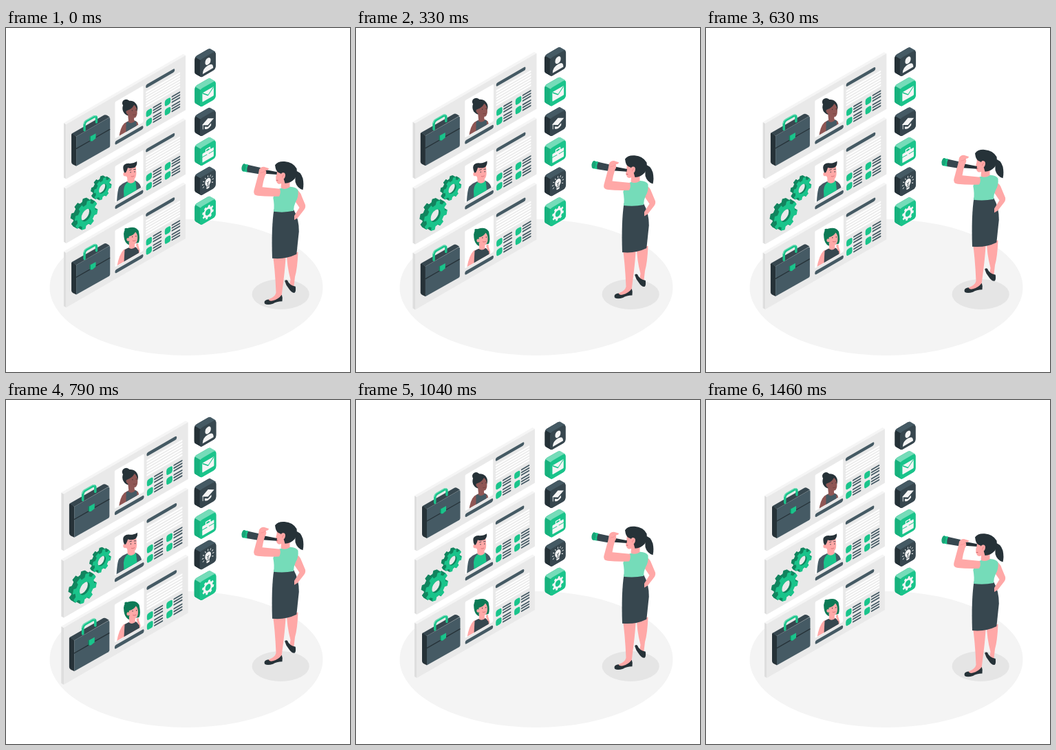
Recreate the animation shown at these times as an HTML page with a canvas. Size 500 px wide and 500 px high, loop 1500 ms.

```html
<!DOCTYPE html>
<html lang="en">
<head>
<meta charset="utf-8">
<title>Choosing a candidate</title>
<style>
html, body { margin: 0; width: 100%; height: 100%; overflow: hidden; background: #fff; }
canvas { display: block; width: 100vw; height: 100vh; }
</style>
</head>
<body>
<canvas id="stage" width="500" height="500"></canvas>
<script>
const ctx = document.getElementById('stage').getContext('2d');
const LOOP = 1500, STEP = LOOP / 36;
const GREEN = '#1ac48b', MINT = '#75dcb9', DEEP = '#12855f';
const INK = '#263238', SLATE = '#37474f', STEEL = '#455a64';
const SKIN = '#ffa8a7', BROWN = '#8f5654', FACE = '#e9e9e9', PALE = '#f5f5f5';

function fill(color, d) {
  ctx.fillStyle = color;
  ctx.fill(new Path2D(d));
}
function stroke(color, width, d) {
  ctx.strokeStyle = color;
  ctx.lineWidth = width;
  ctx.lineCap = ctx.lineJoin = 'round';
  ctx.stroke(new Path2D(d));
}
function oval(color, x, y, rx, ry = rx, turn = 0) {
  ctx.fillStyle = color;
  ctx.beginPath();
  ctx.ellipse(x, y, rx, ry, turn, 0, Math.PI * 2);
  ctx.fill();
}
function box(color, x, y, w, h, r = 0) {
  ctx.fillStyle = color;
  ctx.beginPath();
  ctx.roundRect(x, y, w, h, r);
  ctx.fill();
}
function group(draw) {
  ctx.save();
  draw();
  ctx.restore();
}
function shifted(dy, draw) {
  group(() => {
    ctx.translate(0, dy);
    draw();
  });
}
// Isometric wall plane with its origin at x, y.
function wall(x, y, draw) {
  group(() => {
    ctx.transform(0.866, -0.5, 0, 1, x, y);
    draw();
  });
}
function zoomed(x, y, scale, draw) {
  group(() => {
    ctx.translate(x, y);
    ctx.scale(scale, scale);
    ctx.translate(-x, -y);
    draw();
  });
}

function gearShape(color, x, y, r, teeth = 8) {
  const slice = Math.PI * 2 / teeth;
  ctx.beginPath();
  for (let i = 0; i < teeth; i++) {
    [[-0.29, 0.78], [-0.21, 1], [0.21, 1], [0.29, 0.78]].forEach(([a, k]) => {
      const angle = (i + 0.3 + a) * slice;
      ctx.lineTo(x + Math.cos(angle) * r * k, y + Math.sin(angle) * r * k);
    });
  }
  ctx.closePath();
  ctx.fillStyle = color;
  ctx.fill();
}
function gear(x, y, r, depth) {
  for (let d = depth; d > 0; d -= 0.5) gearShape(DEEP, x - d, y - d, r);
  gearShape(GREEN, x, y, r);
  oval(DEEP, x, y, r * 0.42);
  group(() => {
    ctx.beginPath();
    ctx.arc(x, y, r * 0.42, 0, 7);
    ctx.clip();
    oval(FACE, x - depth * 0.45, y - depth * 0.45, r * 0.42);
  });
}

function briefcase() {
  fill(INK, 'M96 155.5 Q96 154 98 154 L103 158.5 V201 L98 198.5 Q96 197 96 195Z');
  fill(SLATE, 'M96.5 154.3 L143 127.7 Q145 126.8 147 128 L151 130.5 L103 158.5Z');
  fill(STEEL, 'M103 158.5 L149.5 131.6 Q151.5 130.7 151.5 133 V171.5 Q151.5 173.5 150 174.4 L103 201Z');
  stroke(INK, 1.3, 'M103 176 L124 164 M130.5 160 L151 148.3');
  fill(GREEN, 'M123 158.5 L131 154 V161 L126 165.2 L123 165Z');
  fill(DEEP, 'M122 157.5 L123.5 158.5 V165.5 L122 164.5Z');
  stroke(GREEN, 3.4, 'M114.8 149.5 V141.5 Q115 138 118 136.2 L128.5 130.2 Q132 128.8 132 132 V138');
  stroke(MINT, 1.2, 'M114 140.5 Q114.2 137 117 135.3 L128 129 Q130 128.2 131.2 129.2');
}

function womanWithBun() {
  oval(INK, 174.6, 110.5, 5.6, 5.4);
  oval(INK, 180.2, 118, 10.8, 10.8);
  fill(BROWN, 'M164 162 Q166 145 172 139.5 L178 136 L177 126 L186 130 V135 L191 138 Q194 144 194 162Z');
  fill(BROWN, 'M176.5 121 Q183 119 186 113 Q190 116 190.3 122 Q191 128 188 131.3 Q183 133 178 127.5 Q174 126 174.5 122Z');
  fill(STEEL, 'M174 162 L174.5 146 L174.5 138.5 L177 137 Q182 142 187.5 136 L189.5 137 Q189 144 191 147 V162Z');
  stroke(INK, 0.8, 'M183.3 120.9 V121.5 M188.6 120 V120.7');
  stroke('#6d3f3a', 0.7, 'M184.5 127.3 Q186.5 128.2 188 127');
}
function youngMan() {
  fill(STEEL, 'M161 256 Q162 234 165 230 Q170 225 176 223 L188 222 Q195 225 196.5 234 L198 256Z');
  fill(GREEN, 'M172 256 L171 236 Q172 227 177 224 Q182 227 187.5 221.5 Q190 229 190 256Z');
  fill(SKIN, 'M176 215 L186 217 L187 223 Q182 228 176.5 224Z');
  fill(SKIN, 'M174 203 Q181 205 188.5 201.5 L189.2 211 Q189.2 219 184.5 220.5 Q177.5 220.5 174.8 215.5 Q169.8 216 170.4 212 Q171 209 173 210.5Z');
  fill(INK, 'M172 210.5 Q168.5 202 172 199 Q175 196.3 180 197.2 Q186 197.2 190 194.2 Q190.8 200 187 203 Q181 205 177 203.5 Q175.8 207.5 174 210.5Z');
  stroke(INK, 1, 'M181 209.5 V210.2 M186.8 208.8 V209.5');
  stroke(INK, 0.8, 'M179.5 206.8 L182 206 M185.5 205.8 L188 205.7');
  stroke('#c95f66', 0.7, 'M182 216 Q184 216.8 186 215.2');
}
function womanWithBob() {
  const hair = '#0e7a56';
  fill(hair, 'M171.5 303 Q169.5 292 177 290 Q188 286.5 192.5 294 Q195 306 192.5 311 L178 314 Q172.5 311 171.5 303Z');
  stroke(hair, 1.6, 'M176 291 Q172 290 173.5 293');
  fill(SKIN, 'M161 348 Q164 328 171 321 L179 318 L178.5 309 L187 312 V317 L194 321 L196 348Z');
  fill(SKIN, 'M178.5 302 Q185 300.5 188 295.5 Q190.8 298 191 303 Q191.3 310 187.5 312.8 Q182 313.8 179 308.5 Q175.3 309.5 175.3 306 Q176 303 178.5 304.5Z');
  fill(SLATE, 'M171 348 L172.5 321 L178 318 Q183 322 188 317 L192.5 321 L195 348Z');
  fill(SKIN, 'M188.5 314 L190.5 312 Q192.5 312 192 314.5 L194.5 323 L191 320.5Z');
  stroke(INK, 0.9, 'M183.5 302.2 V302.9 M188.8 301.3 V302');
  stroke('#c95f66', 0.7, 'M184 308.3 Q186 309.2 188 307.8');
}

function card(y, person) {
  wall(88.5, y, () => {
    fill('#dedede', 'M0 0 L-4 -4 V74.5 L0 78.5Z');
    fill(PALE, 'M0 0 L-4 -4 H194 L198 0Z');
    box(FACE, 0, 0, 198, 78.5);
    box('#fff', 81, 8.4, 46.8, 52.4, 1.5);
    box(STEEL, 81, 65.2, 46.8, 5.2, 2.4);
    box(STEEL, 132, 9.5, 48, 5, 2.4);
    for (let i = 0; i < 6; i++) box('#fff', 132, 19.4 + i * 4, 57, 2.3, 1);
    for (const u of [132.5, 163.5]) for (const v of [52, 65.3]) {
      box(GREEN, u, v - 4.8, 9.6, 9.4, 3);
      for (let i = -1; i < 2; i++) box(STEEL, u + 11.2, v + i * 3.9 - 1, 14.4, 2, 1);
    }
  });
  group(() => {
    wall(88.5, y, () => {
      ctx.beginPath();
      ctx.rect(81, 4, 46.8, 56.4);
    });
    ctx.clip();
    person();
  });
}
function cards(scale) {
  zoomed(172.7, 223, scale, () => {
    card(325.6, womanWithBob);
    shifted(184.6, briefcase);
    card(233.3, youngMan);
    wall(88.5, 233.3, () => {
      gear(60.6, 30.5, 15, 5);
      gear(33.3, 54.7, 19.3, 7);
    });
    card(141, womanWithBun);
    briefcase();
  });
}

const glyphs = [
  () => {
    oval(PALE, 13.2, 8.6, 4.6, 4.8);
    fill(PALE, 'M4.5 22.5 Q4.5 14.5 13.2 14.5 Q22 14.5 22 22.5Z');
  },
  back => {
    box(PALE, 4, 7, 18.8, 13.2, 1);
    stroke(back, 1.3, 'M4.8 8 L13.4 15 L22 8');
  },
  () => {
    fill(PALE, 'M3.5 10.5 L13.2 5.5 L23 10.5 L13.2 15.5Z');
    fill(PALE, 'M8 15.2 L13.2 18 L18.5 15.2 V18.3 Q13.2 22.3 8 18.3Z');
    stroke(PALE, 0.8, 'M5 11.5 V17');
  },
  back => {
    stroke(PALE, 1.5, 'M9.8 9.5 V6.5 H16.6 V9.5');
    box(PALE, 4, 9.5, 18.8, 12.8, 1);
    stroke(back, 1, 'M4 14.5 H11.5 M15 14.5 H23');
  },
  back => {
    oval(PALE, 13.2, 12, 4.8, 5.2);
    box(PALE, 10.8, 15, 4.8, 6.5, 1);
    stroke(back, 0.8, 'M11.2 18.6 H15.2 M11.7 12 L13.2 14 L14.7 12 M13.2 14 V17');
    for (let i = 0; i < 9; i++) {
      const a = Math.PI * (0.85 + i * 0.1625), c = Math.cos(a), s = Math.sin(a);
      stroke(PALE, 1, `M${13.2 + c * 7.4} ${12.5 + s * 7.4} L${13.2 + c * 9.2} ${12.5 + s * 9.2}`);
    }
  },
  back => {
    gearShape(PALE, 13.2, 13.2, 9.6);
    oval(back, 13.2, 13.2, 4.3);
  }
];
function icons(scale) {
  zoomed(289.5, 158.5, scale, () => glyphs.forEach((glyph, i) => {
    const [front, side, top] = i % 2 ? [GREEN, '#18b27e', MINT] : [SLATE, INK, STEEL];
    wall(282, 47.8 + i * 42.4, () => {
      for (let d = 8.8; d > 0; d -= 0.4) box(side, -d, -d, 26.2, 26.2, 4.5);
      fill(top, 'M1 1 L-7.8 -7.8 Q-6.4 -8.8 -4.4 -8.8 H13.4 Q15.6 -8.8 16.8 -7.8 L25.6 1Z');
      box(front, 0, 0, 26.2, 26.2, 4.5);
      glyph(front);
    });
  }));
}

function telescope() {
  fill(INK, 'M366 203.8 L394 209.3 L393.5 213 L366 211Z');
  fill(SLATE, 'M350 198.6 L370 203 L369 212.6 L349.5 209.2Z');
  fill(GREEN, 'M346 197.5 L352.3 198.8 Q349.5 203.5 350.6 209.5 L345 208.6Z');
  oval('#17a577', 345.5, 203, 3, 5.7, 0.15);
}
function lowerBody() {
  fill(SKIN, 'M408 326 L424.5 326 Q423.5 350 420 362 L418.5 375 L420 380 L412 376 L413.5 366 Q408 345 408 326Z');
  fill(INK, 'M405.2 368 Q406 365.5 409 367 Q411.5 374 420.8 376 Q421.8 383 419.5 385 Q415 385.5 411 379 L407.5 374Z');
  fill(SKIN, 'M387.5 328 H407 Q405.5 350 404 362 L400.5 390 Q394 398 381 398 Q379 396 383 394 Q391 391 392.5 385 Q391 350 387.5 328Z');
  fill(INK, 'M375.5 398.5 Q376.5 395 381.5 394.6 Q383 398 388 396.5 Q396 394.5 400.8 388 Q402.5 392 401.5 397.5 Q393 397.5 388 401 Q380 403.5 376 401Z');
  fill(SLATE, 'M389.5 264 H418 Q426 278 425.8 296 L422.3 329 Q406 337 387 335 Q385.5 290 389.5 264Z');
}
function armOnHip() {
  fill(SKIN, 'M419 234 Q427 235 430 245 L435 257 Q435.8 261 433 264.5 L424 276 L419 279 L419 273 L426.5 261 L417 247Z');
}
function upperBody() {
  fill(MINT, 'M397 234 Q404 231 413 231 Q422 231.5 424.5 236 Q425.5 246 421 253 Q418 259 418 266 Q404 269 389 267 Q390.5 258 388.3 247 Q391 238 397 234Z');
  fill(SKIN, 'M400.5 222 H412.5 V231.5 Q405 236 399.5 232.5Z');
}
function head() {
  fill(INK, 'M420 208 Q428 208 431.5 219 Q433.3 228 431.5 235.5 Q423 233 420.5 224Z');
  fill(SKIN, 'M394 203 L393.5 212 L392.2 217 Q392 225 396 226.8 Q401 227.5 407 222 L410 205Z');
  fill(INK, 'M391 199.5 Q395 193.5 405 194.2 Q417 195 422.5 204.5 Q424 213 419.5 219.5 Q414 225.5 405.5 226 L403.5 219 L399 211.5 Q393 210 391.8 204Z');
  oval(SKIN, 402.5, 215, 3.4, 4.6, 0.2);
  stroke('#e8797f', 0.7, 'M401.5 217 Q401.8 213.5 404 213.5');
  stroke('#c95f66', 0.9, 'M393 221.5 H395');
}
function raisedArm() {
  fill(SKIN, 'M368 206 Q370 201.8 375 202 L382 204.2 Q381.8 207 377.5 207 Q379.5 211 376.5 215 Q373.5 224 372.5 231.5 L398 234 Q400 240 397 244.8 Q380 245.5 366 244 Q359 243 360.3 237 L366.5 214Z');
  stroke('#f28f92', 0.7, 'M370.5 210.5 Q374 211 377.5 207');
}
// The hip arm and the telescope follow the body only part of the way.
function woman(lift) {
  oval('#e5e5e5', 399.2, 387, 41.6, 22);
  shifted(-lift, lowerBody);
  shifted(-lift * 0.6, armOnHip);
  shifted(-lift, () => { upperBody(); head(); });
  shifted(-lift * 0.48, telescope);
  shifted(-lift, raisedArm);
}

// Two quick swells, then a rest.
function swell(t) {
  const keys = [[0, 0], [150, 1], [450, 0], [600, 0], [750, 1], [900, 0], [1500, 0]];
  const i = keys.findIndex(([time]) => time > t);
  const [t0, a] = keys[i - 1], [t1, b] = keys[i];
  return 1 + 0.091 * (a + (b - a) * (t - t0) / (t1 - t0));
}

function frame(now) {
  const t = Math.floor((now % LOOP + 4) / STEP) % 36 * STEP;
  const scale = swell((t + 20) % LOOP);
  const lift = 8.9 * (1 + Math.cos((t - 706) / LOOP * Math.PI * 2));
  ctx.fillStyle = '#fff';
  ctx.fillRect(0, 0, 500, 500);
  oval('#f4f4f4', 262, 377, 198.5, 99);
  cards(scale);
  icons(scale);
  woman(lift);
}
const start = performance.now();
function tick() {
  frame(performance.now() - start);
  requestAnimationFrame(tick);
}
tick();
</script>
</body>
</html>
```
